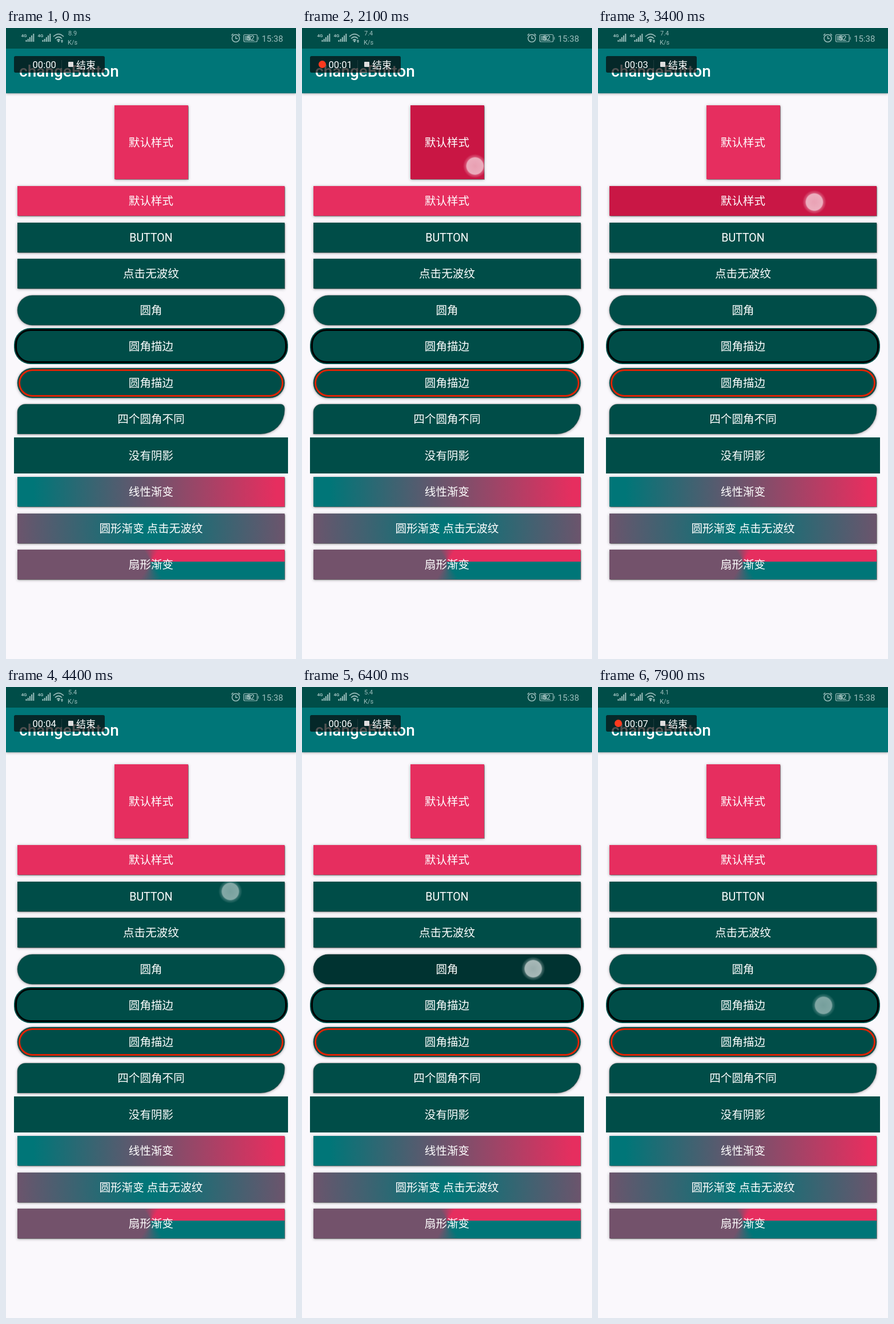
An HTML page that plays this animation: 508 by 1102 pixels, repeating every 8000 ms.

```html
<!DOCTYPE html>
<html lang="zh">
<head>
<meta charset="utf-8">
<title>changeButton</title>
<style>
:root { --dark: #004d48; --teal: #007678; --pink: #e62e5f; --mid: #73526b; --tint: #9dbfbd; }
html, body { margin: 0; width: 100%; height: 100%; overflow: hidden; background: #faf8fc; }
body { position: relative; color: #fff; font-family: Roboto, "Noto Sans CJK SC", "Noto Sans CJK", sans-serif; }
#stage { position: absolute; left: 0; top: 0; width: 508px; height: 1102px; overflow: hidden; }
#stage * { position: absolute; box-sizing: border-box; white-space: nowrap; }

/* bars */
.status { width: 508px; height: 35.5px; background: var(--dark); color: var(--tint); }
.status svg { left: 0; top: 0; }
.appbar { top: 35px; width: 508px; height: 79px; background: var(--teal); box-shadow: 0 1px 4px rgba(0,0,0,.35); }
.title { left: 23px; top: 24px; font: 500 28px/34px Roboto, sans-serif; }

/* rolling text: one line shows at a time */
.roll { overflow: hidden; height: var(--h); line-height: var(--h); }
.roll > span { left: 0; top: 0; white-space: pre !important; }
.speed { --h: 14px; left: 108px; top: 3px; width: 17px; font-size: 11px; }
.speed > span { left: 1px; animation: speed 8s step-end infinite; }
.unit { left: 108px; top: 18px; font-size: 11px; line-height: 15px; }

/* recorder */
.rec { left: 14px; top: 49px; width: 159px; height: 28.5px; border-radius: 3px; background: rgba(8,8,8,.7); }
.clock { --h: 22px; left: 32.5px; top: 4.5px; width: 46px; font-size: 16.6px; }
.clock > span { animation: clock 8s step-end infinite; }
.lamp { left: 15px; top: 8px; width: 14px; height: 14px; animation: lamp 8s step-end infinite; }
.lamp i { width: 13px; height: 13px; border-radius: 50%; background: #ff3a1e; animation: blink 1s linear infinite; }
.rule { left: 83px; top: 7px; width: 1px; height: 15px; background: rgba(255,255,255,.1); }
.stop { left: 95px; top: 10px; width: 9px; height: 9px; border-radius: 1px; background: #ddd; }
.end { left: 109px; top: 5px; font-size: 17px; line-height: 22px; }

/* buttons */
.btn {
  left: 20px; top: calc(276px + 63.5px * var(--i)); width: 468px; height: 52px;
  background: var(--dark); box-shadow: 0 0 1px .5px rgba(0,0,0,.4), 0 1px 5px rgba(0,0,0,.35);
  overflow: hidden;
}
.btn b {
  inset: 0; padding-top: 2.4px; display: flex; align-items: center; justify-content: center;
  font: 400 19.6px/1 Roboto, "Noto Sans CJK SC", "Noto Sans CJK", sans-serif;
}
.pink { background: var(--pink); --press: #c91745; }
.square { left: 189.5px; top: 135px; width: 129px; height: 129px; }
.wide { left: 14px; width: 480px; height: 63px; margin-top: -5.7px; box-shadow: none; }
.pill { border-radius: 26px; }
.wide.pill { border-radius: 29px; }
.ring { inset: 2px; border: 3px solid var(--c); border-radius: 27px; }
.mixed { border-radius: 14px 7px 42px 0; }
.linear { background: linear-gradient(90deg, var(--teal) 6%, var(--pink) 97%); }
.radial { background: radial-gradient(circle 490px at center, var(--teal) 2%, var(--pink)); }
.sweep { background: conic-gradient(from 90deg at 50% 41%, var(--teal) 15%, var(--mid) 34% 66%, var(--pink) 85%); }

/* touches: each one plays at its own time --t in the loop */
.wave {
  left: calc(var(--x) - 420px); top: calc(var(--y) - 420px); width: 840px; height: 840px;
  border-radius: 50%; background: var(--press, #003331); opacity: 0;
  animation: wave 8s linear calc(var(--t) - 8s) infinite;
}
.flat { inset: 0; background: #003331; opacity: 0; animation: flat 8s step-end calc(var(--t) - 8s) infinite; }
.tap {
  left: calc(var(--x) - 21px); top: calc(var(--y) - 21px); width: 42px; height: 42px; opacity: 0;
  background: radial-gradient(circle, rgba(255,255,255,.6) 0, rgba(255,255,255,.65) 13px, rgba(255,255,255,.64) 14.4px, rgba(255,255,255,.26) 16px, rgba(255,255,255,0) 21px);
  animation: tap 8s linear calc(var(--t) - 8s) infinite;
}
.tap.last { animation: last 8s linear infinite; }

@keyframes speed {
  0% { transform: none; }
  7.5% { transform: translateY(-14px); }
  45% { transform: translateY(-28px); }
  82.5% { transform: translateY(-42px); }
}
@keyframes clock {
  0% { transform: none; }
  17.5% { transform: translateY(-22px); }
  27.5% { transform: translateY(-44px); }
  40% { transform: translateY(-66px); }
  52.5% { transform: translateY(-88px); }
  65.5% { transform: translateY(-110px); }
  77.5% { transform: translateY(-132px); }
  90% { transform: translateY(-154px); }
}
@keyframes lamp { 0% { opacity: 0; } 4% { opacity: 1; } }
@keyframes blink {
  0%, 10% { opacity: 1; }
  20%, 50% { opacity: 0; }
  65%, 100% { opacity: 1; }
}
@keyframes wave {
  0%, 1.5% { transform: scale(0); opacity: 1; }
  4.25% { transform: none; opacity: 1; }
  7.5% { transform: none; opacity: 1; }
  11%, 100% { transform: none; opacity: 0; }
}
@keyframes flat { 0% { opacity: 0; } 1.2% { opacity: 1; } 7.5% { opacity: 0; } }
@keyframes tap {
  0% { opacity: .7; }
  1.4% { opacity: .8; }
  2.2%, 7.5% { opacity: 1; }
  8.4%, 100% { opacity: 0; }
}
@keyframes last { 0%, 97.4% { opacity: 0; } 97.5%, 100% { opacity: .77; } }
</style>
</head>
<body>
<div id="stage">
  <div class="appbar"><span class="title">changeButton</span></div>

  <div class="status">
    <svg width="508" height="36" fill="#9dbfbd" font-family="Roboto, sans-serif">
      <defs>
        <g id="signal">
          <text x="0" y="16" font-size="8" font-weight="700">4G</text>
          <path d="M8 21h2v3h-2zM11.2 19h2v5h-2zM14.4 16h2v8h-2zM17.6 13h2v11h-2zM20.8 10h2v14h-2z"/>
        </g>
      </defs>
      <use href="#signal" x="26.5"/>
      <use href="#signal" x="55.5"/>
      <g fill="none" stroke="#9dbfbd" stroke-width="1.7">
        <path d="M83 15q9-9 18 0M86 18.5q6-6 12 0M89 21.5q3-3 6 0"/>
        <circle cx="402.5" cy="18" r="6.5" stroke-width="1.5"/>
        <path d="M402.5 14v4.5h3.5M395 13l3-3M410 13l-3-3" stroke-width="1.5"/>
        <rect x="416.5" y="11.5" width="23.5" height="12.5" rx="2" stroke-width="1.2"/>
      </g>
      <circle cx="92" cy="23" r="1.7"/>
      <path d="M98 20l2 3h-4zM98 26l2-2.5h-4z"/>
      <path d="M418.5 13.5h10.5v8.5h-10.5zM441.3 15.5h1.7v5h-1.7z" opacity=".6"/>
      <text x="428.5" y="22" font-size="12" text-anchor="middle" fill="#c4d9d8">52</text>
      <text x="448" y="23.5" font-size="15">15:38</text>
    </svg>
    <div class="speed roll"><span>8.9
7.4
5.4
4.1</span></div>
    <span class="unit">K/s</span>
  </div>

  <div class="rec">
    <div class="lamp"><i></i></div>
    <div class="clock roll"><span>00:00
00:01
00:02
00:03
00:04
00:05
00:06
00:07</span></div>
    <i class="rule"></i><i class="stop"></i><span class="end">结束</span>
  </div>

  <div class="btn pink square"><i class="wave" style="--x:113.5px;--y:106px;--t:1.5s"></i><b>默认样式</b></div>
  <div class="btn pink" style="--i:0"><i class="wave" style="--x:359px;--y:28px;--t:2.95s"></i><b>默认样式</b></div>
  <div class="btn" style="--i:1"><i class="wave" style="--x:373px;--y:18px;--t:4.3s"></i><b>BUTTON</b></div>
  <div class="btn" style="--i:2"><i class="flat" style="--t:5.05s"></i><b>点击无波纹</b></div>
  <div class="btn pill" style="--i:3"><i class="wave" style="--x:384px;--y:26px;--t:6.05s"></i><b>圆角</b></div>
  <div class="btn wide pill" style="--i:4"><i class="ring" style="--c:#000"></i><b>圆角描边</b></div>
  <div class="btn pill" style="--i:5"><i class="ring" style="--c:#de2305"></i><b>圆角描边</b></div>
  <div class="btn mixed" style="--i:6"><b>四个圆角不同</b></div>
  <div class="btn wide" style="--i:7"><b>没有阴影</b></div>
  <div class="btn linear" style="--i:8"><b>线性渐变</b></div>
  <div class="btn radial" style="--i:9"><b>圆形渐变 点击无波纹</b></div>
  <div class="btn sweep" style="--i:10"><b>扇形渐变</b></div>

  <i class="tap" style="--x:303px;--y:241px;--t:1.5s"></i>
  <i class="tap" style="--x:379px;--y:304px;--t:2.95s"></i>
  <i class="tap" style="--x:393px;--y:357px;--t:4.3s"></i>
  <i class="tap" style="--x:404px;--y:423px;--t:5.05s"></i>
  <i class="tap" style="--x:404.5px;--y:492px;--t:6.05s"></i>
  <i class="tap last" style="--x:394.5px;--y:555.5px"></i>
</div>
</body>
</html>
```
